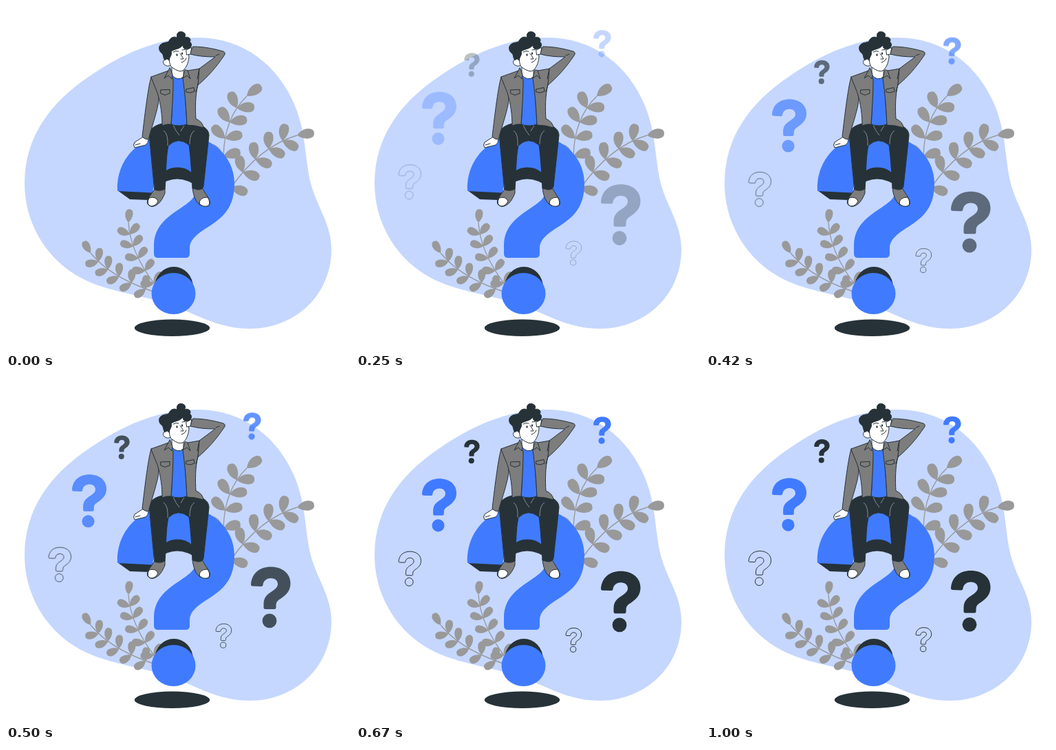
An HTML page for the animation above (1040 ms loop, 500 px wide and 500 px high).

```html
<!DOCTYPE html>
<html lang="en">
<head>
<meta charset="utf-8">
<title>Thinking it over</title>
<style>
  html, body { margin: 0; width: 100%; height: 100%; overflow: hidden; background: #fff; }
  svg { display: block; width: 100%; height: 100%; }
  .blue { fill: #407bff; }
  .dark { fill: #263238; }
  .outline { fill: none; stroke: #263238; }
  .outline * { vector-effect: non-scaling-stroke; stroke-width: 1px; }
  .plant { fill: #999; }
  .plant .stem { fill: none; stroke: #999; stroke-width: 1.4; }
  .lined { stroke: #263238; stroke-width: 1; stroke-linejoin: round; stroke-linecap: round; }
  .gray { fill: #7d7d7d; }
  .white { fill: #fff; }
  .line { fill: none; }
  .crease { fill: none; stroke: #aeb4b8; stroke-width: .7; }
</style>
</head>
<body>
<svg viewBox="0 0 500 500">
  <defs>
    <g id="mark">
      <path d="M2.5 28Q0 28 0 25.5C1 10 12 0 29 0C46 0 57.5 10 57.5 24C57.5 34 52 40 45 45C39 49 36.5 50 36.5 57V59Q36.5 61.5 34 61.5H21Q18.5 61.5 18.5 59V54C18.5 44 24 40 30 36C36 32 39 29 39 25C39 20 35 16.5 29 16.5C22 16.5 18 21 17.5 26Q17.5 28.5 15 28.4Z"/>
      <circle cx="27" cy="78.3" r="10.4"/>
    </g>
    <path id="leaf" d="M0 0C.2-.2.42-.31.68-.29C.93-.26 1.04-.1 1 0C1.02.16.9.28.66.28C.42.28.2.17 0 0Z"/>
  </defs>

  <path fill="#c5d7ff" d="M27 258C27 190 65 140 120 103C170 68 225 45 280 46C345 47 395 85 420 145C437 187 434 222 443 258C452 292 473 317 473 354C473 420 420 469 355 469C310 469 280 450 240 434C190 418 140 415 100 390C55 362 27 312 27 258Z"/>

  <g id="plants"></g>
  <g id="marks"></g>

  <ellipse class="dark" cx="241.5" cy="467.8" rx="54.7" ry="12.2"/>
  <ellipse class="dark" cx="244" cy="409" rx="28" ry="30"/>
  <ellipse class="blue" cx="243.5" cy="418" rx="32" ry="30"/>

  <path class="dark" d="M162 268L180 281L207 282L214 270Z"/>
  <path class="dark" d="M220 250Q248 218 280 246V264Q250 240 220 262Z"/>
  <path class="blue" d="M162 269C160 221 196 186 247 186C297 186 332 217 332 258C332 290 318 305 300 317C280 330 267 338 267 352V360Q267 366 261 366H221Q215 366 215 360V348C215 320 235 306 255 293C268 284 277 278 277 262C277 246 267 234.5 249 234.5C229 234.5 216 250 213 271.5Z"/>

  <g class="lined">
    <path class="gray" d="M216 266L206 281Q203 290 212 291.5C222 291 228 280 231 272V265Z"/>
    <path class="white" d="M208 279Q218 276 221 284Q217 291 211 291Q203 289 208 279Z"/>
    <path class="gray" d="M271 264C272 275 276 287 284 290Q297 294 296.5 285C295 279 290 273 286 266Z"/>
    <path class="white" d="M281 287Q281 278 293 278Q298 286 294 290.5Q286 293 281 287Z"/>
    <path class="dark" d="M208 185C210 176 222 171 233 170H268C285 172 295 178 295 188L287 262Q286 267 279 267L271 265C270 245 268 215 266 202Q250 189 236 203C232 220 233 245 231 266Q224 270 216 267Z"/>
  </g>
  <path class="crease" d="M229 181Q236 186 235 203M274 181Q267 185 267 201M243 173Q246 181 252 188M259 174Q256 178 254 182"/>

  <g class="lined">
    <path class="white" d="M198 191L187 198Q184 202 187 206L203 202Q207 199 207 194Z"/>
    <path class="line" d="M188 202L195 200"/>
    <path class="blue" d="M241 101L259 102C260 130 262 150 263 172Q251 176 240 172C242 150 242 130 241 101Z"/>
    <path class="gray" d="M211 103C206 120 201 165 198 190Q202 194 207 194C212 175 221 150 222 136L220 107Z"/>
    <path class="gray" d="M211 103L236 94L243 106C243 130 241 155 240 172Q234 171 227 174C227 158 225 143 220 126Z"/>
    <path class="gray" d="M257 105L264 94L282 91L279 114C275 130 275 150 276 164Q286 168 287 177Q275 173 263 173C262 150 260 125 257 105Z"/>
    <path class="gray" d="M272 59C290 59 305 63 316 66Q320 68 317 72C305 90 293 103 279 115L281 91L304 74C291 74 279 73 268 70Z"/>
    <path class="line" d="M279 115L276 125M281 91L278 106M305 72L310 70"/>
    <path class="gray" d="M225 122L238 121.5V127L231 129.5L225 127ZM262 121L273 118.5L274 124L268 126L262 125Z"/>
    <path class="white" d="M241 86V100Q249 110 258 103V88Z"/>
    <path class="gray" d="M238 90L230 105L236 101L241 106L242 100ZM260 93L257 105L263 101L268 106L264 94Z"/>
    <path class="white" d="M239 76C230 75 226 81 230 85Q234 89 240 86Z"/>
    <path class="white" d="M240 61C236 75 237 86 241 89Q252 97 257 94C262 90 265 83 266 74L263 55Z"/>
    <path class="white" d="M262 64L270 60L268 70L263 71Z"/>
    <path class="dark" d="M237 79Q234 75 231 79C228 75 229 71 227 69C222 66 221 59 225 56C229 52 234 54 237 51C239 45 245 44 249 46C247 40 251 36 256 37.5C261 39 262 43 259 46C266 43 270 49 267 52C272 55 269 62 264 62C260 64 257 61 257 57C252 63 246 62 240 66C242 71 238 73 237 79Z"/>
    <path class="line" d="M243 67Q247 64 251 66M256 64L261 63M253 69Q256 73 258 77L254 77M255 82Q260 81 262 76"/>
  </g>
  <ellipse class="dark" cx="248.5" cy="71" rx="1.2" ry="1.8"/>
  <ellipse class="dark" cx="256" cy="69" rx="1.2" ry="1.8"/>
</svg>
<script>
  const LOOP = 1040, FPS = 24, DROP = 30;
  const marksLayer = document.getElementById('marks');
  const plantsLayer = document.getElementById('plants');

  function add(parent, tag, attrs) {
    const node = document.createElementNS('http://www.w3.org/2000/svg', tag);
    for (const key in attrs) node.setAttribute(key, attrs[key]);
    return parent.appendChild(node);
  }

  const mix = (a, b, t) => a + (b - a) * t;
  const mixPoint = (p, q, t) => [mix(p[0], q[0], t), mix(p[1], q[1], t)];

  // The stem is a quadratic curve; leaf pairs sit at even steps and open wider towards the root.
  function addPlant(tip, bend, root, pairs, size) {
    const plant = add(plantsLayer, 'g', { class: 'plant' });
    const end = mixPoint(bend, root, 1.3);
    add(plant, 'path', { class: 'stem', d: `M${tip}Q${bend} ${root}L${end}` });

    for (let i = 0; i <= pairs; i++) {
      const t = i / pairs;
      const ahead = mixPoint(tip, bend, t), behind = mixPoint(bend, root, t);
      const [x, y] = mixPoint(ahead, behind, t);
      const heading = Math.atan2(ahead[1] - behind[1], ahead[0] - behind[0]) * 180 / Math.PI;
      const turns = i ? [-56, mix(46, 72, t)] : [8];
      for (const turn of turns) {
        add(plant, 'use', { href: '#leaf', transform: `translate(${x} ${y}) rotate(${heading + turn}) scale(${size})` });
      }
    }
  }

  addPlant([350, 131], [317, 163], [316, 219], 4, 25.5);
  addPlant([423, 188], [369, 204], [327, 264], 5, 25);
  addPlant([178, 315], [180.5, 357], [215, 403], 5, 19.5);
  addPlant([123, 359], [149, 391], [203, 411], 5, 19.5);

  function addMark(look, x, y, scale) {
    const node = document.getElementById('mark').cloneNode(true);
    node.removeAttribute('id');
    node.setAttribute('class', look);
    marksLayer.appendChild(node);
    return drop => node.setAttribute('transform', `translate(${x} ${y + drop}) scale(${scale})`);
  }

  const moveMarks = [
    addMark('dark', 356, 280, 1),
    addMark('blue', 96, 145.6, .87),
    addMark('dark', 157.2, 89, .39),
    addMark('blue', 345, 55.7, .445),
    addMark('outline', 62, 251.5, .565),
    addMark('outline', 305, 362.7, .395)
  ];

  const bezier = (a, b, s) => 3 * (1 - s) ** 2 * s * a + 3 * (1 - s) * s * s * b + s ** 3;

  // cubic-bezier(.36, -.01, .5, 1.38): overshoots, then settles
  function ease(x) {
    if (x >= 1) return 1;
    let low = 0, high = 1;
    for (let i = 0; i < 30; i++) {
      const mid = (low + high) / 2;
      if (bezier(.36, .5, mid) < x) low = mid; else high = mid;
    }
    return bezier(-.01, 1.38, low);
  }

  function render(time) {
    const step = Math.floor((time % LOOP + 5) * FPS / 1000);
    const progress = ease((step + 1) / FPS);
    marksLayer.setAttribute('opacity', progress < .03 ? 0 : Math.min(1, progress));
    for (const move of moveMarks) move((progress - 1) * DROP);
  }

  const start = performance.now();
  function tick() {
    render(performance.now() - start);
    requestAnimationFrame(tick);
  }
  tick();
</script>
</body>
</html>
```
